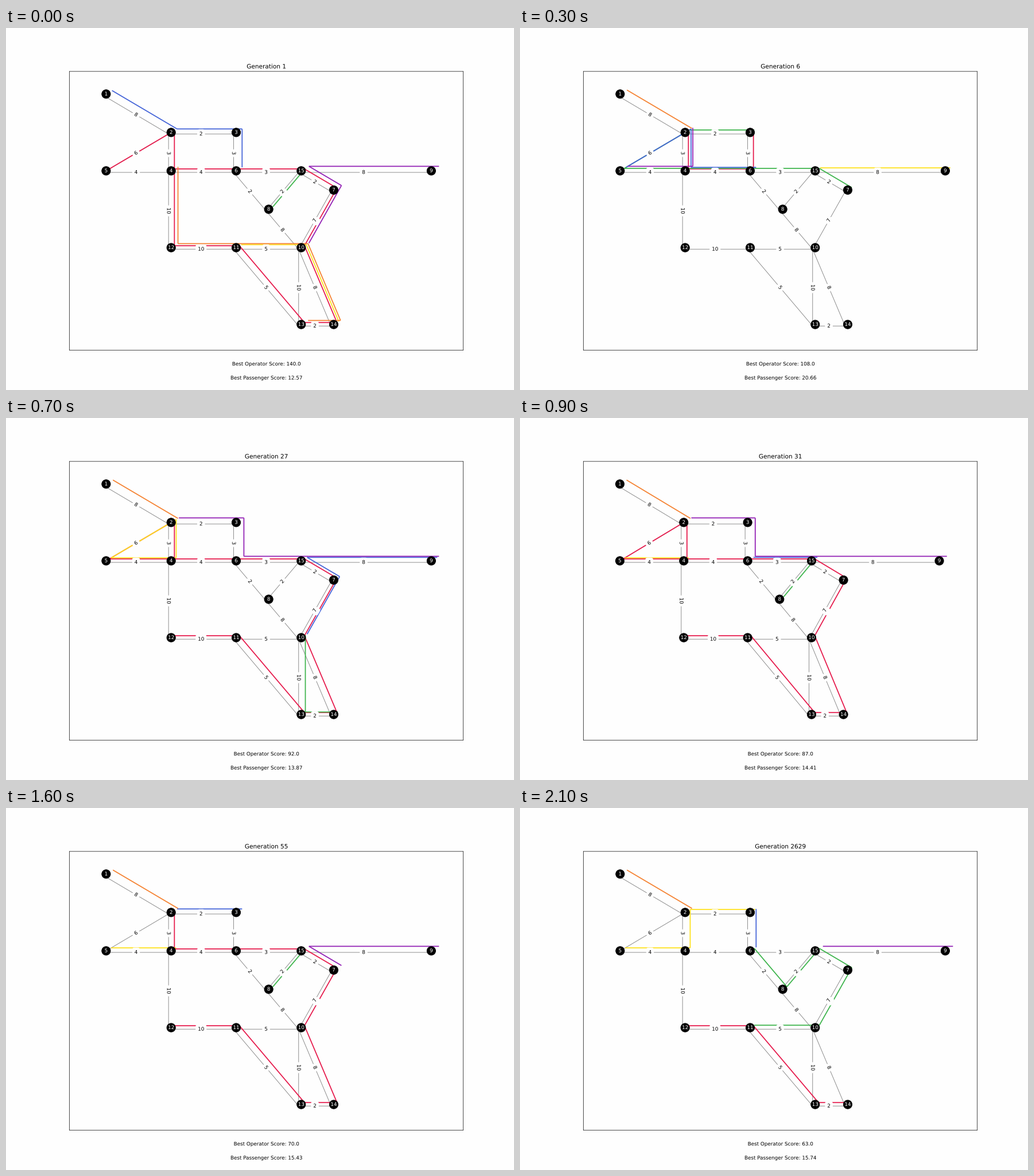
Animation of 885x632 px, one loop 2.2 s. Source, as a matplotlib script:

```python
import numpy as np
import matplotlib.pyplot as plt
from matplotlib.animation import FuncAnimation
from matplotlib.collections import LineCollection
from matplotlib.patches import Circle
from matplotlib.patheffects import Normal

W, H, DPI = 885, 632, 64
K = 63.2 / DPI  # the chart is laid out at 63.2 dpi
PAPER = "#fefefe"
COLORS = ["#e6194b", "#3cb44b", "#ffe119", "#4363d8", "#f58231", "#911eb4"]
RADIUS = np.sqrt(300) / 2 * 63.2 / 72
OUTLINE = [Normal()]  # draws text as outlines, free of the pixel grid

# Stops as (column, row) of the street grid
NODES = {1: (0, 0), 2: (1, 1), 3: (2, 1), 4: (1, 2), 5: (0, 2), 6: (2, 2),
         7: (3.5, 2.5), 8: (2.5, 3), 9: (5, 2), 10: (3, 4), 11: (2, 4),
         12: (1, 4), 13: (3, 6), 14: (3.5, 6), 15: (3, 2)}

# Edges as "from-to:weight", each running left to right or downwards
EDGES = ("1-2:8 2-3:2 2-4:3 5-2:6 5-4:4 3-6:3 4-6:4 6-15:3 15-9:8 6-8:2 8-15:2 "
         "15-7:2 8-10:8 10-7:7 4-12:10 12-11:10 11-10:5 11-13:5 10-13:10 "
         "10-14:8 13-14:2").split()

# step: (generation, operator score, passenger score, one route per colour)
KEYS = {
    0: (1, 140, 12.57, "5-2-4-6-15-7-10-14-13-11-12-4 8-15 11-10-14 1-2-3-6 "
                       "4-12-11-10-14-13 9-15-7-10"),
    2: (3, 114, 24.33, "2-4-6-3 3-2-5-4-6-15-7 15-9 5-2-4-6 "
                       "1-2-4-12-11-13-14-10-8 15-9"),
    5: (24, 97, 13.33, "3-2-4-6-8-15-7-10-11-12 10-13-14 4-5-2-4 10-7-15-9 "
                       "1-2 5-4-2"),
    9: (31, 87, 14.41, "4-5-2-4-6-15-7-10-14-13-11-12 8-15 5-4 6-15 "
                       "1-2 2-3-6-15-9"),
    12: (43, 82, 13.51, "3-2-4-6-8-15-7-10-11-12 7-10-13-14 5-4-6 15-7 "
                        "1-2 15-9"),
    16: (55, 70, 15.43, "2-4-6-15-7-10-14-13-11-12 8-15 5-4 2-3 1-2 9-15-7"),
    21: (2629, 63, 15.74, "12-11-13-14 11-10-7-15-8-6 5-4-2-3 3-6 1-2 15-9"),
}
STEPS = 22
TIMES = sorted(KEYS)
SWITCH = [0.35, 0.9, 0.7, 0.55, 0.2, 0.2]  # when each colour takes its next route

# Autoscaled views: x origin, x unit, y origin, y unit
VIEW = (174.4, 113.3, 115.3, 67.05)
VIEWS = {2: (174.4, 113.3, 124.1, 65.65), 5: (174.5, 113.4, 115.3, 67.05),
         9: (174.0, 111.3, 115.3, 67.05)}

plt.rcParams["text.hinting"] = "none"
fig = plt.figure(figsize=(W / DPI, H / DPI), dpi=DPI, facecolor=PAPER)
ax = fig.add_axes([0.125, 0.11, 0.775, 0.77], facecolor=PAPER)
ax.set(xlim=(0.125 * W, 0.9 * W), ylim=(0.89 * H, 0.12 * H), xticks=[], yticks=[])
for spine in ax.spines.values():
    spine.set(linewidth=0.8 * K, snap=False)
title = ax.set_title("", fontsize=12 * K, pad=6 * K, path_effects=OUTLINE)
scores = [ax.text(0.5, y, "", transform=ax.transAxes, fontsize=10 * K,
                  ha="center", va="center", path_effects=OUTLINE)
          for y in (-0.05, -0.1)]
drawn = []


def state(step):
    """Generation, both scores and the six routes at a step."""
    gen, oper, pas = (np.array([KEYS[t][i] for t in TIMES], float) for i in range(3))
    generation = round(float(np.exp(np.interp(step, TIMES, np.log(gen)))))
    operator = round(float(np.interp(step, TIMES, oper)))
    passenger = float(np.interp(step, TIMES, pas))
    a = max(t for t in TIMES if t <= step)
    b = min(t for t in TIMES if t >= step)
    part = (step - a) / max(b - a, 1)
    old, new = KEYS[a][3].split(), KEYS[b][3].split()
    routes = [n if part >= s else o for o, n, s in zip(old, new, SWITCH)]
    return generation, operator, passenger, routes


def locate(view, node, shift=0.0):
    x, y = NODES[int(node)]
    x0, ux, y0, uy = view
    return np.array([x0 + (x + shift) * ux, y0 + (y - shift) * uy])


def add_lines(segments, color, width, z):
    lines = LineCollection(segments, colors=color, linewidths=width * K,
                           zorder=z, snap=False)
    drawn.append(ax.add_collection(lines, autolim=False))


def add_label(pos, text, **style):
    drawn.append(ax.text(*pos, text, fontsize=10 * K, ha="center", va="center",
                         path_effects=OUTLINE, **style))


def draw(step):
    while drawn:
        drawn.pop().remove()
    view = VIEWS.get(step, VIEW)
    generation, operator, passenger, routes = state(step)
    title.set_text(f"Generation {generation}")
    scores[0].set_text(f"Best Operator Score: {operator:.1f}")
    scores[1].set_text(f"Best Passenger Score: {passenger:.2f}")

    streets = []
    for edge in EDGES:
        ends, weight = edge.split(":")
        p, q = (locate(view, n, -0.04) for n in ends.split("-"))
        streets.append((p, q))
        dx, dy = q - p
        add_label((p + q) / 2, weight, zorder=3,
                  rotation=np.degrees(np.arctan2(-dy, dx)),
                  bbox=dict(boxstyle="round,pad=0.4", fc=PAPER, ec=PAPER, lw=K))
    add_lines(streets, "gray", 1, 1)

    for i, (route, color) in enumerate(zip(routes, COLORS)):
        stops = [locate(view, n, 0.05 + 0.0137 * i) for n in route.split("-")]
        add_lines(list(zip(stops, stops[1:])), color, 2, 1.1 + 0.1 * i)

    for node in NODES:
        spot = locate(view, node)
        drawn.append(ax.add_patch(Circle(spot, RADIUS, fc="black", ec="black",
                                         lw=K, zorder=2)))
        add_label(spot, str(node), color="white", zorder=4)
    return drawn


anim = FuncAnimation(fig, draw, frames=STEPS, init_func=lambda: draw(0),
                     interval=100, repeat=True, repeat_delay=0, blit=False)
plt.show()
```
